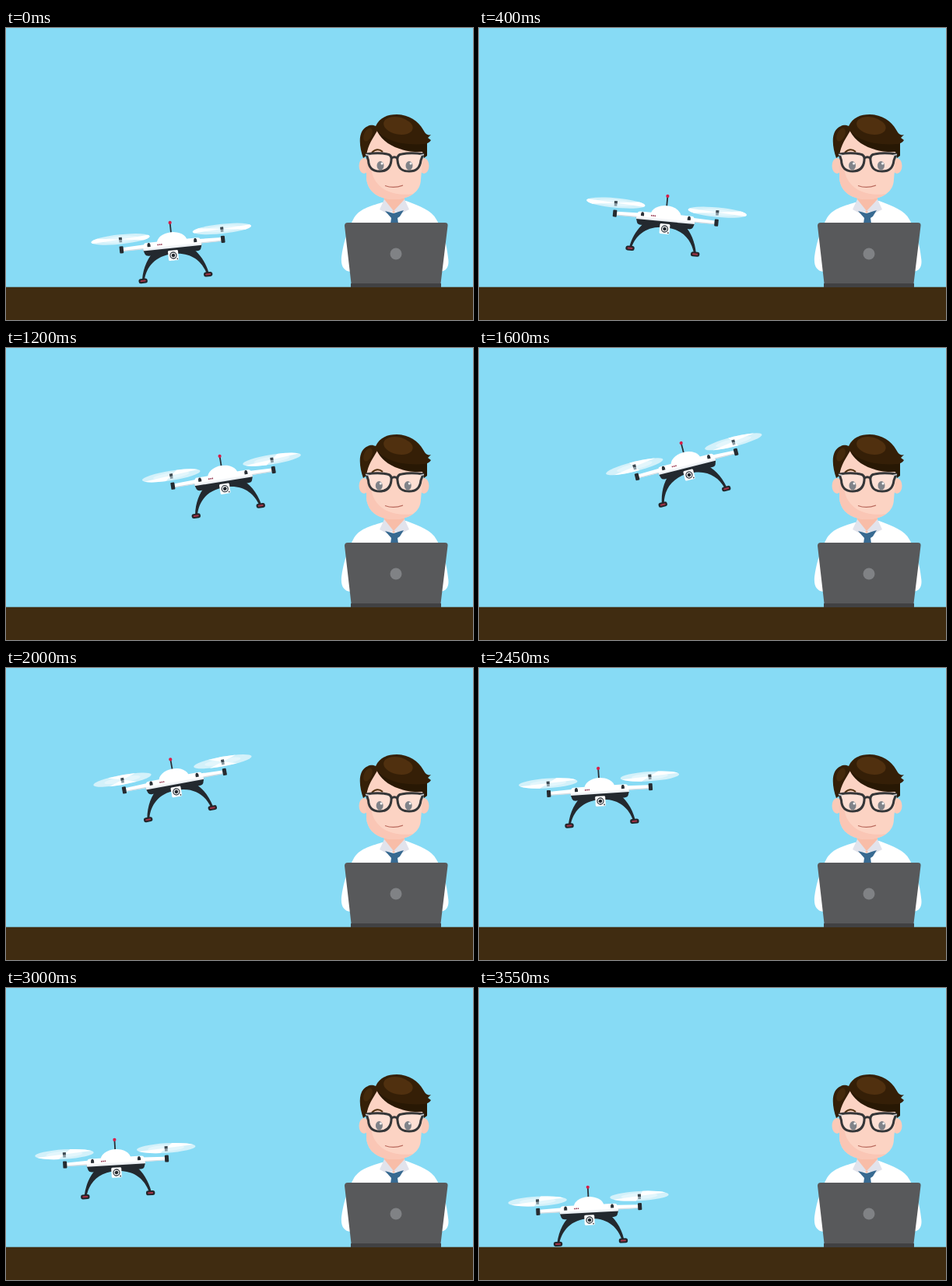
An HTML page that plays this animation: 600x375 px, repeating every 3600 ms.

```html
<!DOCTYPE html>
<html lang="en">
<head>
<meta charset="utf-8">
<title>Drone flight</title>
<style>
  html, body { margin: 0; width: 100%; height: 100%; overflow: hidden; background: #87dbf5; }
  svg { display: block; width: 600px; height: 375px; }
</style>
</head>
<body>
<svg viewBox="0 0 600 375">
  <defs>
    <linearGradient id="shell" x2="0" y2="1">
      <stop offset=".6" stop-color="#fff"/>
      <stop offset="1" stop-color="#e4e9ee"/>
    </linearGradient>
    <g id="rotor">
      <g transform="translate(65.5 -27.5) scale(37.8 6.2)">
        <circle r="1" fill="#d3f1fa"/>
        <g class="blades" fill="#fff">
          <path id="blade" d="M0 0L.88-.47A1 1 0 0 1 .88 .47Z"/>
          <use href="#blade" transform="rotate(180)"/>
        </g>
        <circle r=".62" fill="#fff" opacity=".35"/>
      </g>
      <path d="M63.5-30h4v3.500h-4z" fill="#3d4a52"/>
      <path d="M63.700-26.500h3.600v3h-3.600z" fill="#8b9ba3"/>
    </g>
    <g id="half">
      <path d="M34-17.500L63-16.500V-12H34Z" fill="#fff"/>
      <path d="M34-13L63-12.800V-11.600H34Z" fill="#d5dde3"/>
      <rect x="63" y="-18.500" width="5" height="9" rx="1" fill="#262b30"/>
      <path d="M0-9H22C32-2 40 11 43 27H40C36 12 24-2 0-2Z" fill="#23292f"/>
      <rect x="36.300" y="25.700" width="11.400" height="6" rx="2.800" fill="#23262b"/>
      <rect x="38.500" y="27.700" width="7" height="2" rx="1" fill="#a83246"/>
    </g>
  </defs>

  <rect width="600" height="375" fill="#87dbf5"/>
  <rect y="332.700" width="600" height="43" fill="#402c11"/>

  <g id="man">
    <path d="M483 224C468 229 453 232 446 246C440 258 434 272 431 294C430 306 434 312 443 313H558C566 312 570 306 568 295C566 275 560 258 553 246C547 234 532 229 514 222Z" fill="#fff"/>
    <path d="M485 208H512V224L498 238L486 224Z" fill="#f8bda8"/>
    <path d="M486 220L480 233L489 238L498 235ZM512 220L518 233L508 238L498 235Z" fill="#e1e3ec"/>
    <path d="M487 235L498 238L511 234L506 242L503 244L504 251H494L495 244Z" fill="#386a91"/>
    <g fill="#fbcab8">
      <ellipse cx="460" cy="177" rx="6.500" ry="10"/>
      <ellipse cx="537" cy="177" rx="6.500" ry="10"/>
    </g>
    <path d="M463 130V192C464 211 480 220 498 220C519 220 533 210 533 194L538 140Z" fill="#fcd3c3"/>
    <path d="M463 165V192C464 211 480 220 498 220C508 220 516 218 523 213C498 217 472 207 469 180Z" fill="#fac6b5"/>
    <path d="M476 128L541 146V164L537 167L535 159C512 160 487 152 477 133Z" fill="#281804"/>
    <path d="M459 167C453 150 452 131 465 126C469 124 472 125 475 126C480 115 490 111 502 111C520 111 532 122 538 134C540 137 543 138 546 137L542 141L546 144C544 147 542 148 538 149C512 151 488 146 477 132C472 141 465 149 463 164Z" fill="#351f07"/>
    <ellipse cx="504" cy="125.500" rx="19" ry="11" transform="rotate(12 504 125)" fill="#50300f"/>
    <ellipse cx="465" cy="137" rx="5" ry="9" transform="rotate(25 465 137)" fill="#452a0c"/>
    <path d="M470 160Q477 153 484 159" fill="none" stroke="#50300f" stroke-width="2"/>
    <g fill="#fff" fill-opacity=".28" stroke="#353638" stroke-width="3" stroke-linejoin="round">
      <path d="M463 162Q478 159.500 490 162Q496 163 495 170C494 180 489 184 480 184C470 184 466 179 465.500 170Z"/>
      <path d="M536 162Q521 159.500 508 162Q502 163 503 170C504 180 508 184 518 184C528 184 532 179 533 170Z"/>
      <path d="M495 167.500Q499 164 503 167.500" fill="none"/>
    </g>
    <path d="M462 162.500L467 163.500M537 162.500L532 163.500" stroke="#c9cbce" stroke-width="1.300"/>
    <g id="eyes">
      <g id="eye">
        <ellipse cx="480" cy="176.800" rx="4.500" ry="5.700" fill="#808389"/>
        <circle cx="482" cy="174" r="1.500" fill="#fff"/>
      </g>
      <use href="#eye" x="37"/>
    </g>
    <path d="M487 202.500Q498 206.500 510 202" fill="none" stroke="#b8695c" stroke-width="1.200"/>
  </g>

  <g id="laptop">
    <rect x="443" y="328" width="116" height="5" fill="#414143"/>
    <path d="M439 250H564Q568 250 567.500 254L558.500 328H443.500L435 254Q435 250 439 250Z" fill="#58595b"/>
    <circle cx="501" cy="290" r="7.500" fill="#808285"/>
  </g>

  <g id="drone">
    <path d="M0-42V-28" stroke="#2b3036" stroke-width="1.800"/>
    <circle cy="-42.300" r="2.100" fill="#d81e48"/>
    <path d="M-38-11H38L36-5Q35-2.500 31-2.500H-31Q-35-2.500-36-5Z" fill="#23292f"/>
    <use href="#half"/>
    <use href="#half" transform="scale(-1 1)"/>
    <path d="M-33-19.500H33Q36-19.500 36.500-17L38-9.500H-38L-36.500-17Q-36-19.500-33-19.500Z" fill="url(#shell)"/>
    <path d="M-19.500-17A19.500 13 0 0 1 19.500-17Z" fill="#fff"/>
    <path d="M-32-14V-17L-31-19H-29L-28-17V-14ZM32-14V-17L31-19H29L28-17V-14Z" fill="#2b3036"/>
    <path d="M-19-15.500H-13" stroke="#8f2a44" stroke-width="1.600" stroke-dasharray="1.500 .8"/>
    <rect x="-6.500" y="-6.500" width="13" height="13" rx="1.500" fill="#fff"/>
    <circle r="4" fill="#fff" stroke="#394047" stroke-width="1.300"/>
    <circle r="2.300" fill="#20262c"/>
    <circle cx="4.800" cy="4.800" r=".9" fill="#394047"/>
    <use href="#rotor"/>
    <use href="#rotor" x="-131"/>
  </g>
</svg>

<script>
const LOOP = 3600, STEP = 50;

// time, camera x, camera y, tilt in degrees, eye shift
const poses = [
  [0, 215, 292, -5.9, 1],
  [400, 238.5, 258, 5.3, -.5],
  [850, 274, 206, -2.2, -1.3],
  [1600, 270, 163, -14.1, 0],
  [2450, 156, 171, -3.9, 0],
  [3000, 142, 237, -3.5, -.6],
  [3550, 142, 298, -3, .8]
];

const drone = document.getElementById('drone');
const eyes = document.getElementById('eyes');
const blades = document.querySelector('.blades');

function slope(i, k) {
  const a = poses[Math.max(i - 1, 0)];
  const b = poses[Math.min(i + 1, poses.length - 1)];
  return (b[k] - a[k]) / (b[0] - a[0]);
}

// Cubic Hermite curve through the poses
function sample(t, k) {
  let i = 0;
  while (i < poses.length - 2 && t >= poses[i + 1][0]) i++;
  const a = poses[i], b = poses[i + 1], span = b[0] - a[0];
  const u = (t - a[0]) / span, v = 1 - u;
  return v * v * (1 + 2 * u) * a[k] + u * u * (3 - 2 * u) * b[k]
    + span * u * v * (v * slope(i, k) - u * slope(i + 1, k));
}

function draw() {
  const t = Math.floor(performance.now() % LOOP / STEP) * STEP;
  const [x, y, tilt, look] = [1, 2, 3, 4].map(k => sample(t, k));
  drone.setAttribute('transform', `translate(${x} ${y}) rotate(${tilt})`);
  eyes.setAttribute('transform', `translate(${look} 0)`);
  blades.setAttribute('transform', `rotate(${t / STEP * 65 + 10})`);
  requestAnimationFrame(draw);
}
draw();
</script>
</body>
</html>
```
